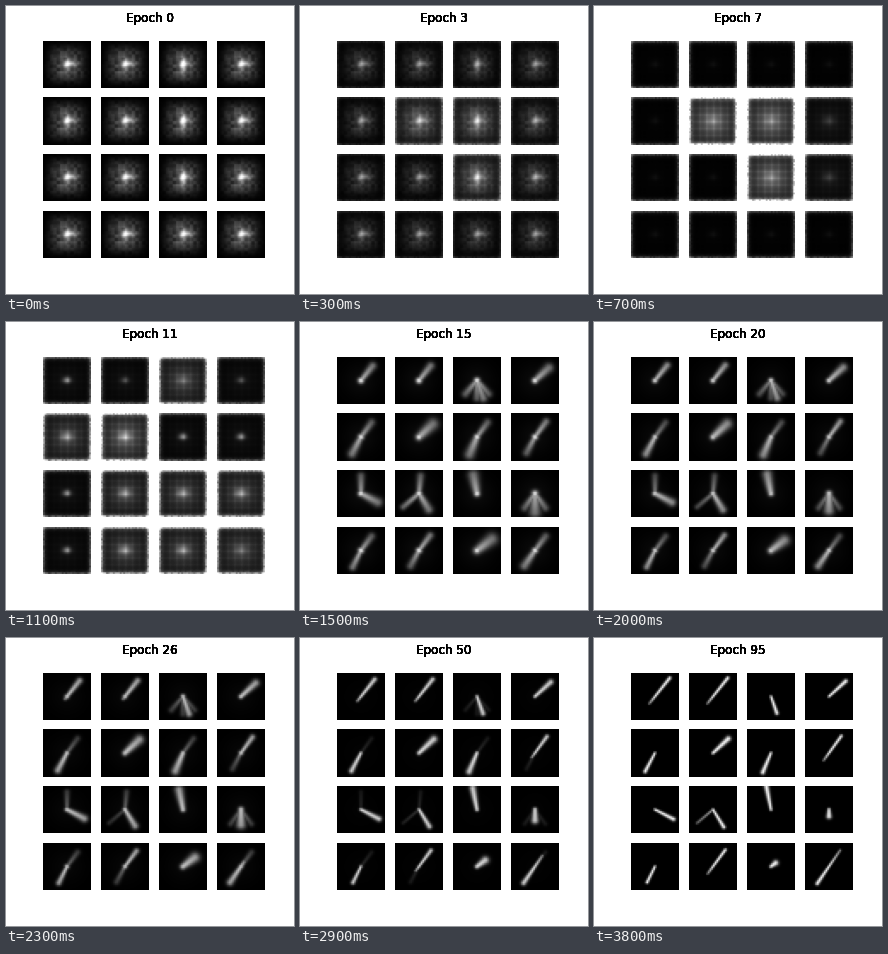
A matplotlib script that plays this animation: 288x288 px, repeating every 4 s.

```python
import matplotlib.pyplot as plt
import numpy as np
from matplotlib.animation import FuncAnimation

SIDE = 288          # stage size in pixels
CELLS = 28          # resolution of each generated picture
TILE = 48           # drawing units across one tile

EPOCHS = [*range(20), *range(20, 30, 2), *range(30, 100, 5), 95]

rng = np.random.default_rng(4)
cell = np.arange(CELLS)
axis = (cell + 0.5) * TILE / CELLS
X, Y = np.meshgrid(axis - TILE / 2, axis - TILE / 2)


def dot(sx, sy=None, x=0, y=0):
    """Gaussian spot of height one."""
    return np.exp(-0.5 * (((X - x) / sx) ** 2 + ((Y - y) / (sy or sx)) ** 2))


def hand(angle, reach, near, far, light, tip):
    """Soft stroke from the centre; angle in degrees clockwise from twelve."""
    a = np.radians(angle)
    dx, dy = np.sin(a), -np.cos(a)
    along = np.clip(X * dx + Y * dy, 0, reach)
    t = along / max(reach, 1e-6)
    dist = np.hypot(X - along * dx, Y - along * dy)
    return (light + (tip - light) * t) * np.exp(
        -0.5 * (dist / (near + (far - near) * t)) ** 2)


# --- blurry stages ---------------------------------------------------------
ripple = 1 - 0.14 * (cell % 2) - 0.18 * (cell % 4 == 0)
WEAVE = np.outer(ripple, ripple)
BLOCKS = np.kron(rng.uniform(0.65, 1.35, (14, 14)), np.ones((2, 2)))
edge = np.exp(-np.minimum(axis, TILE - axis) / 1.2)
RIM = np.add.outer(edge, edge) * rng.uniform(0.6, 1.1, (CELLS, CELLS))


def first_glow(upright):
    soft = 0.24 * np.exp(-(X / 18) ** 4 - (Y / 18) ** 4) + 0.15 * dot(7)
    bar = (0.4 - 0.2 * upright) * dot(4.5, 1.8, 5, -1)
    post = (0.12 + 0.28 * upright) * dot(2, 7, 0, 1)
    return soft * BLOCKS * (0.3 + 0.7 * WEAVE) + bar + post + 0.45 * dot(2.3, 2.3, 0, -1)


def grid_glow(level, peak, size):
    """Woven glow with a pale ragged border."""
    glow = level * (0.35 + 0.65 * dot(11)) + peak * dot(size, size * 0.8, 0, -0.5)
    return glow * WEAVE * 1.2 + (0.5 + 2.8 * level) * RIM


def seventh(i):
    if i in (5, 6, 10):
        return grid_glow(0.45, 0.15, 4)
    return grid_glow(0.1, 0.14, 4) if i in (7, 11) else grid_glow(0.015, 0.04, 3)


def eleventh(i):
    peak = 0.25 if i in (1, 2, 3, 15) else 0.5
    if i in (2, 4, 5, 9, 10, 11, 13, 14, 15):
        return grid_glow(0.4 if i == 5 else 0.28, peak * 0.75, 4)
    return grid_glow(0.07, peak, 2.8)


# --- hands that sharpen ----------------------------------------------------
def clock(angle, wide=1, reach=21, tail=0, ghosts=()):
    """A hand whose ghosts fade and whose reach and tail settle in time."""
    def paint(epoch):
        s = np.log(epoch / 15) / np.log(95 / 15)
        k = (20 / epoch) ** 0.45
        near, far = max(0.9, 1.5 * wide * k), 2.5 * wide * k
        length = 19 + (reach - 19) * s
        fade = (1 - s) ** 1.3
        start = 0.65 + 0.3 * s
        parts = [hand(angle, length, near, far, start, 0.45 + 0.5 * s),
                 hand(angle + 180, tail * s, near, near, start, 0.5),
                 0.9 * (1 - 0.4 * s) * dot(1.9 * k)]
        parts += [hand(g, 18, 1.5 * k, 2.4 * k, 0.6 * fade, 0.35 * fade)
                  for g in ghosts]
        return np.maximum.reduce(parts) + 0.04 * fade * dot(12)
    return paint


def fork(epoch):
    """Two lower hands; the left one dips away and returns."""
    s = np.log(epoch / 15) / np.log(95 / 15)
    left = 0.65 * abs(2 * s - 1)
    k = (20 / epoch) ** 0.45
    return np.maximum(clock(149, 1.1, ghosts=(5,))(epoch),
                      hand(229, 21, 1.6 * k, 2 * k, left, left * 0.6))


UP, DOWN = 36, 208
TILES = [
    clock(UP + 2, reach=24, tail=9), clock(UP + 2, reach=24, tail=9),
    clock(161, 1.1, 18, ghosts=(140, 180, 220)), clock(47, 1.2, 23),
    clock(DOWN, 1.1, ghosts=(UP,)), clock(47, 1.5),
    clock(DOWN - 5, 1.3, ghosts=(UP,)), clock(UP, 0.9, tail=9, ghosts=(DOWN,)),
    clock(118, 1.2, ghosts=(0,)), fork,
    clock(349, 1.4, 24), clock(180, 1.5, 7, ghosts=(145, 215)),
    clock(DOWN - 2, 0.9, 18, ghosts=(UP,)), clock(UP, 0.9, tail=9, ghosts=(DOWN,)),
    clock(52, 1.6, 6), clock(DOWN + 6, 1.1, tail=20, ghosts=(UP,)),
]


def upright(i):
    row, col = divmod(i, 4)
    return 0.9 * (col == 2 and row < 3) + 0.3 * (col == 0 and row == 1)


GLOWS = np.array([[f(i) for i in range(16)] for f in
                  (lambda i: first_glow(upright(i)), seventh, eleventh)])


def pictures(epoch):
    """All sixteen tiles at one epoch."""
    shapes = np.array([tile(max(epoch, 15)) for tile in TILES])
    if epoch >= 15:
        return shapes
    stages = [*GLOWS, shapes]
    place = np.interp(epoch, [0, 7, 11, 15], range(4))
    low = int(place)
    mix = place - low
    return (1 - mix) * stages[low] + mix * stages[low + 1]


# --- figure ----------------------------------------------------------------
fig = plt.figure(figsize=(4, 4), dpi=72, facecolor="white")
# Stacked copies harden the text edges.
titles = [fig.text(0.5, 0.98, "", size=12, ha="center", va="top",
                   family="DejaVu Sans") for _ in range(12)]
images = []
for i in range(16):
    row, col = divmod(i, 4)
    left = 37 + 58 * col
    top, bottom = round(34.7 + 56.7 * row), round(82 + 56.7 * row)
    ax = fig.add_axes([left / SIDE, 1 - bottom / SIDE,
                       TILE / SIDE, (bottom - top) / SIDE])
    ax.axis("off")
    images.append(ax.imshow(GLOWS[0, i], cmap="gray", vmin=0, vmax=1,
                            aspect="auto"))


def draw(frame):
    epoch = EPOCHS[frame]
    for title in titles:
        title.set_text(f"Epoch {epoch}")
    for image, picture in zip(images, pictures(epoch)):
        image.set_data(np.clip(picture, 0, 1))
    return titles + images


anim = FuncAnimation(fig, draw, frames=len(EPOCHS), interval=100, repeat=True)
plt.show()
```
